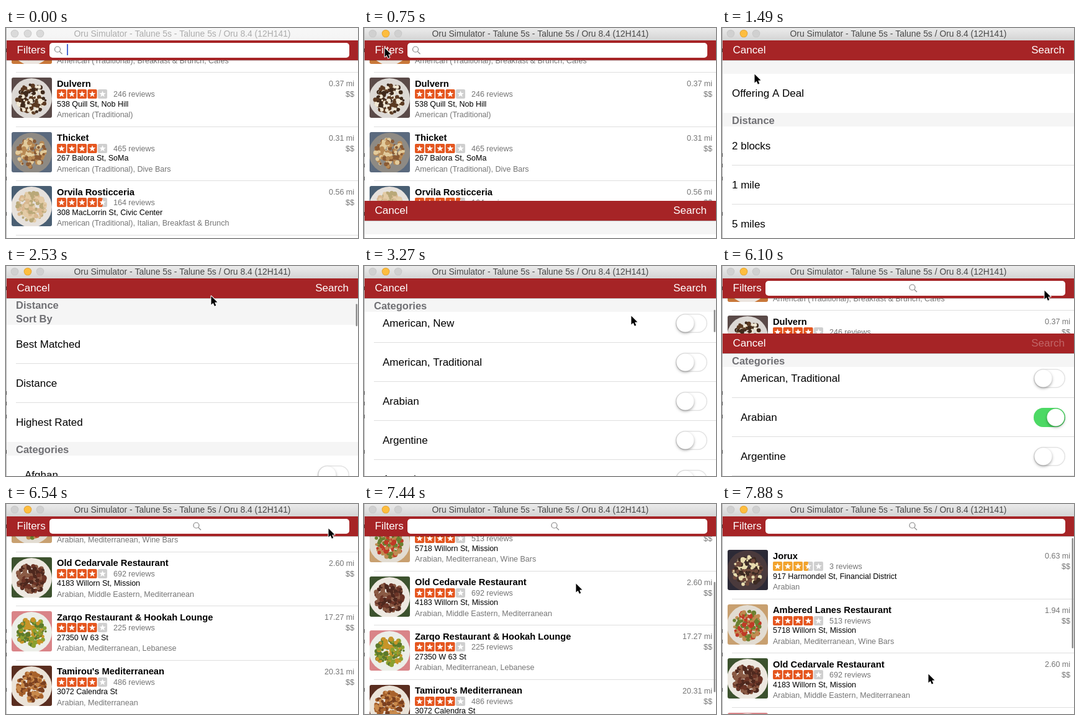
These frames come from a looping animation (567x339 px, 8 s). An HTML page with a canvas:

```html
<!DOCTYPE html>
<html lang="en">
<head>
<meta charset="utf-8">
<title>Restaurant filters</title>
<style>
html, body { margin: 0; width: 567px; height: 339px; overflow: hidden; background: #fff; }
canvas { display: block; }
</style>
</head>
<body>
<canvas id="stage" width="567" height="339"></canvas>
<script>
const g = document.getElementById('stage').getContext('2d');
const FONT = '"Liberation Sans", Arial, sans-serif';
const W = 567, H = 339, LOOP = 8000, STEP = 148.7;
const RED = '#a62426', GREY = '#757575', LINE = '#dedede';
const OPEN = 700, CLOSE = 6040, LOADED = 6500, PULL = 7250;

// photo: background, plate, then food colours
const before = [
  ['', 4, '', '', 'American (Traditional), Breakfast & Brunch, Cafes', '', ['#c9783a', '#ece6e0', '#c9783a', '#e0b070']],
  ['Dulvern', 4, '246', '538 Quill St, Nob Hill', 'American (Traditional)', '0.37', ['#5a4a48', '#dcd8d4', '#5b3a22', '#3f2a1c', '#efe6d2']],
  ['Thicket', 4, '465', '267 Balora St, SoMa', 'American (Traditional), Dive Bars', '0.31', ['#5b6a7e', '#8e8a84', '#b98a54', '#e2cb9c', '#8a5a34']],
  ['Orvila Rosticceria', 4.5, '164', '308 MacLorrin St, Civic Center', 'American (Traditional), Italian, Breakfast & Brunch', '0.56', ['#4a5f73', '#e6e1dc', '#e3cba6', '#d9b890', '#b9a878']]
];
const after = [
  ['Jorux', 3.5, '3', '917 Harmondel St, Financial District', 'Arabian', '0.63', ['#2c2a36', '#4a3a3c', '#6f4a3c', '#e8dcae', '#3c2a22']],
  ['Ambered Lanes Restaurant', 4, '513', '5718 Willorn St, Mission', 'Arabian, Mediterranean, Wine Bars', '1.94', ['#c8a070', '#e2dcd2', '#c03a26', '#6a8030', '#c08a50']],
  ['Old Cedarvale Restaurant', 4, '692', '4183 Willorn St, Mission', 'Arabian, Middle Eastern, Mediterranean', '2.60', ['#3c522e', '#ede8e0', '#6b3426', '#4e281e', '#8a5a44']],
  ['Zarqo Restaurant & Hookah Lounge', 4, '225', '27350 W 63 St', 'Arabian, Mediterranean, Lebanese', '17.27', ['#d98488', '#eceee8', '#8aa030', '#c89428', '#5c7a2c']],
  ["Tamirou's Mediterranean", 4, '486', '3072 Calendra St', 'Arabian, Mediterranean', '20.31', ['#5a2e20', '#ebe3d8', '#a8622c', '#c98a4c', '#7a4020']]
];

const sections = [
  ['', ['Offering A Deal']],
  ['Distance', ['2 blocks', '1 mile', '5 miles']],
  ['Sort By', ['Best Matched', 'Distance', 'Highest Rated']],
  ['Categories', ['Afghan', 'African', 'American, New', 'American, Traditional', 'Arabian',
    'Argentine', 'Armenian', 'Asian Fusion', 'Asturian', 'Australian']]
];

// pointer path: time, x, y
const path = [
  [148, 400, 340], [595, 33, 32], [1339, 33, 32], [1487, 52, 74], [1784, 353, 231],
  [2090, 353, 231], [2230, 352, 224], [2379, 342, 128], [2528, 330, 48], [2826, 334, 51],
  [3271, 430, 80], [3866, 536, 114], [4312, 536, 114], [4609, 537, 156],
  [4906, 537, 156], [5204, 528, 45], [5502, 528, 14], [5800, 519, 39],
  [6560, 519, 39], [7286, 342, 97], [7435, 341, 128], [7732, 335, 236], [7881, 332, 274]
];

const clamp = v => Math.max(0, Math.min(1, v));
const spring = ms => ms < 0 ? 0 : 1 - Math.exp(-.0183 * ms) * (1 + .0183 * ms);

function pointerAt(t) {
  const i = path.findIndex(p => p[0] > t);
  if (i < 0) return path[path.length - 1].slice(1);
  if (!i) return [0, 400];
  const [a, b] = [path[i - 1], path[i]], p = (t - a[0]) / (b[0] - a[0]);
  return [a[1] + (b[1] - a[1]) * p, a[2] + (b[2] - a[2]) * p];
}

function rect(x, y, w, h, fill, r = 0) {
  g.fillStyle = fill;
  g.beginPath();
  g.roundRect(x, y, w, h, r);
  g.fill();
}

function disc(x, y, r, fill) {
  g.fillStyle = fill;
  g.beginPath();
  g.arc(x, y, r, 0, 7);
  g.fill();
}

function text(s, x, y, size, fill = '#000', weight = '', align = 'left') {
  g.font = `${weight} ${size}px ${FONT}`;
  g.fillStyle = fill;
  g.textAlign = align;
  g.fillText(s, x, Math.round(y));
}

function photo(x, y, [back, plate, ...food]) {
  let seed = back.charCodeAt(1) * 31 + plate.charCodeAt(3);
  const rnd = () => (seed = (seed * 16807) % 2147483647) / 2147483647;
  rnd();
  g.save();
  g.beginPath();
  g.roundRect(x, y, 65, 65, 3);
  g.clip();
  rect(x, y, 65, 65, back);
  disc(x + 32, y + 34, 33, plate);
  for (let i = 0; i < 150; i++) {
    const a = rnd() * 6.3, d = Math.sqrt(rnd()) * 23;
    disc(x + 32 + d * Math.cos(a), y + 34 + d * Math.sin(a), 1.5 + rnd() * 2.5, food[i % food.length]);
  }
  g.restore();
}

function stars(x, y, rating) {
  for (let i = 0; i < 5; i++, x += 16.5) {
    rect(x, y, 15, 15, '#cfcfcf', 2);
    const part = clamp(rating - i);
    if (part) rect(x, y, 15 * part, 15, rating < 4 ? '#f2a32e' : '#e5561f', 2);
    g.fillStyle = '#fff';
    g.beginPath();
    for (let k = 0; k < 10; k++) {
      const r = k % 2 ? 2.3 : 5.6, a = k * Math.PI / 5;
      g.lineTo(x + 7.5 + r * Math.sin(a), y + 7.8 - r * Math.cos(a));
    }
    g.fill();
  }
}

function place([name, rating, reviews, street, kinds, miles, colours], y) {
  photo(9, Math.round(y + 8), colours);
  text(name, 82, y + 22.5, 14.7, '#000', 'bold');
  stars(82, Math.round(y + 27), rating);
  text(reviews + ' reviews', 173, y + 39, 12.5, GREY);
  text(street, 82, y + 54.5, 12.5);
  text(kinds, 82, y + 72, 12.5, GREY);
  text(miles + ' mi', 561, y + 22, 12.5, GREY, '', 'right');
  text('$$', 561, y + 39, 12.5, GREY, '', 'right');
  rect(16, Math.floor(y + 87), W, 1, LINE);
}

function scrollBar(y, h, alpha) {
  g.globalAlpha = clamp(alpha);
  rect(563.5, y, 2.5, h, '#8c8c8c', 1.2);
  g.globalAlpha = 1;
}

function navBar() {
  rect(0, 20, W, 32, RED);
  rect(0, 52, W, 1, 'rgba(0,0,0,.22)');
}

function searchField(t) {
  const typing = t < 1200;
  rect(70, 24, 483, 24, '#fff', 5);
  const x = typing ? 83 : 306.5;
  g.strokeStyle = '#858585';
  g.lineWidth = 1.2;
  g.beginPath();
  g.arc(x, 34.5, 4.5, 0, 7);
  g.moveTo(x + 3.3, 37.8);
  g.lineTo(x + 7.5, 42);
  g.stroke();
  if (typing && t % 1000 < 500) rect(98, 26, 2, 18, '#4a69d4');
}

function results(t, pointerY) {
  rect(0, 20, W, H, '#fff');
  const loaded = t > LOADED, pulled = t > PULL;
  let top = loaded ? -97.5 : -15.5;
  if (pulled) {
    top += pointerY - 96.5;
    if (top > 52) top = 52 + (top - 52) / 2;   // rubber band
  }
  (loaded ? after : before).forEach((p, i) => place(p, top + i * 87.5));
  if (pulled) scrollBar(55 + Math.max(0, 52 - top) * .6, 178, 1);
  navBar();
  text('Filters', 17.5, 41, 17, '#fff');
  searchField(t);
}

function toggle(y, on) {
  const x = 502, cx = x + 15.5 + on * 20;
  rect(x, y, 51, 31, '#e3e3e3', 15.5);
  rect(x + 1.5, y + 1.5, 48, 28, '#fff', 14);
  g.globalAlpha = on;
  rect(x, y, 51, 31, '#4cd964', 15.5);
  g.globalAlpha = 1;
  g.save();
  g.shadowColor = 'rgba(0,0,0,.35)';
  g.shadowBlur = 4;
  g.shadowOffsetY = 2;
  disc(cx, y + 15.5, 14, '#fff');
  g.restore();
}

// dragged by the pointer, then coasting to rest
function filterOffset(t, pointerY) {
  if (t < 2090) return 0;
  if (t < 2500) return Math.round(231 - pointerY);
  return Math.round(Math.min(709, 275 + 447 * (1 - Math.exp((2528 - t) / 420))));
}

function filters(t, pointerY) {
  const off = filterOffset(t, pointerY), heads = [];
  rect(0, 20, W, H, '#fff');
  let y = 52 - off;
  for (const [title, rows] of sections) {
    const head = { title, y };
    heads.push(head);
    y += 22;
    const switches = title === 'Categories';
    rows.forEach((row, i) => {
      if (y > -63 && y < H) {
        text(row, switches ? 30 : 16, y + 37, 17);
        if (switches) toggle(y + 16, row === 'Arabian' ? clamp((t - 4650) / 220) : 0);
        if (i < rows.length - 1) rect(16, y + 62, W, 1, LINE);
      }
      y += 63;
    });
    head.end = y;
  }
  for (const { title, y, end } of heads) {
    if (end <= 52) continue;
    const top = Math.min(Math.max(y, 52), end - 22);
    rect(0, top, W, 22, '#f5f5f5');
    text(title, 16, top + 17.5, 16.5, '#707074', 'bold');
  }
  if (t > 2200) scrollBar(54 + off * .026, 36, 1 - (t - 4015) / 370);
  navBar();
  text('Cancel', 17.5, 41, 17, '#fff');
  text('Search', 552, 41, 17, t > 5900 ? 'rgba(255,255,255,.3)' : '#fff', '', 'right');
}

function titleBar(active) {
  const shade = g.createLinearGradient(0, 0, 0, 20);
  shade.addColorStop(0, active ? '#ebebeb' : '#f7f7f7');
  shade.addColorStop(1, active ? '#d4d4d4' : '#f4f4f4');
  rect(0, 0, W, 20, shade);
  [14, 35, 55].forEach((x, i) => {
    const lit = active && i === 1;
    disc(x, 9, 6.3, lit ? '#dfa032' : '#c6c6c6');
    disc(x, 9, 5.5, lit ? '#fdbd3f' : active ? '#d0d0d0' : '#dadada');
  });
  text('Oru Simulator - Talune 5s - Talune 5s / Oru 8.4 (12H141)', 284, 14, 13.9,
    active ? '#484848' : '#acacac', '', 'center');
}

function pointer(x, y) {
  g.save();
  g.translate(Math.round(x) + .5, Math.round(y) + .5);
  g.beginPath();
  [[0, 0], [0, 14], [3.2, 11.2], [5.4, 16.2], [7.8, 15.2], [5.7, 10.3], [10, 10]].forEach(p => g.lineTo(...p));
  g.closePath();
  g.lineJoin = 'round';
  g.lineWidth = 2;
  g.strokeStyle = '#fff';
  g.stroke();
  g.fillStyle = '#000';
  g.fill();
  g.restore();
}

function draw(t) {
  const [px, py] = pointerAt(t);
  results(t, py);
  if (t > OPEN && t < LOADED) {
    g.save();
    g.translate(0, Math.round(320 * (1 - spring(t - OPEN) + spring(t - CLOSE))));
    g.beginPath();
    g.rect(0, 20, W, H);
    g.clip();
    filters(t, py);
    g.restore();
  }
  titleBar(t > 580);
  rect(0, 0, 1, H, '#b4b4b4');
  [36, 205, 222, 243, 300].forEach(y => rect(0, y - 3, 1, 6, '#444'));
  pointer(px, py);
}

function frame(now) {
  draw(Math.floor((now % LOOP + 14) / STEP) * STEP);
  requestAnimationFrame(frame);
}
requestAnimationFrame(frame);
</script>
</body>
</html>
```
